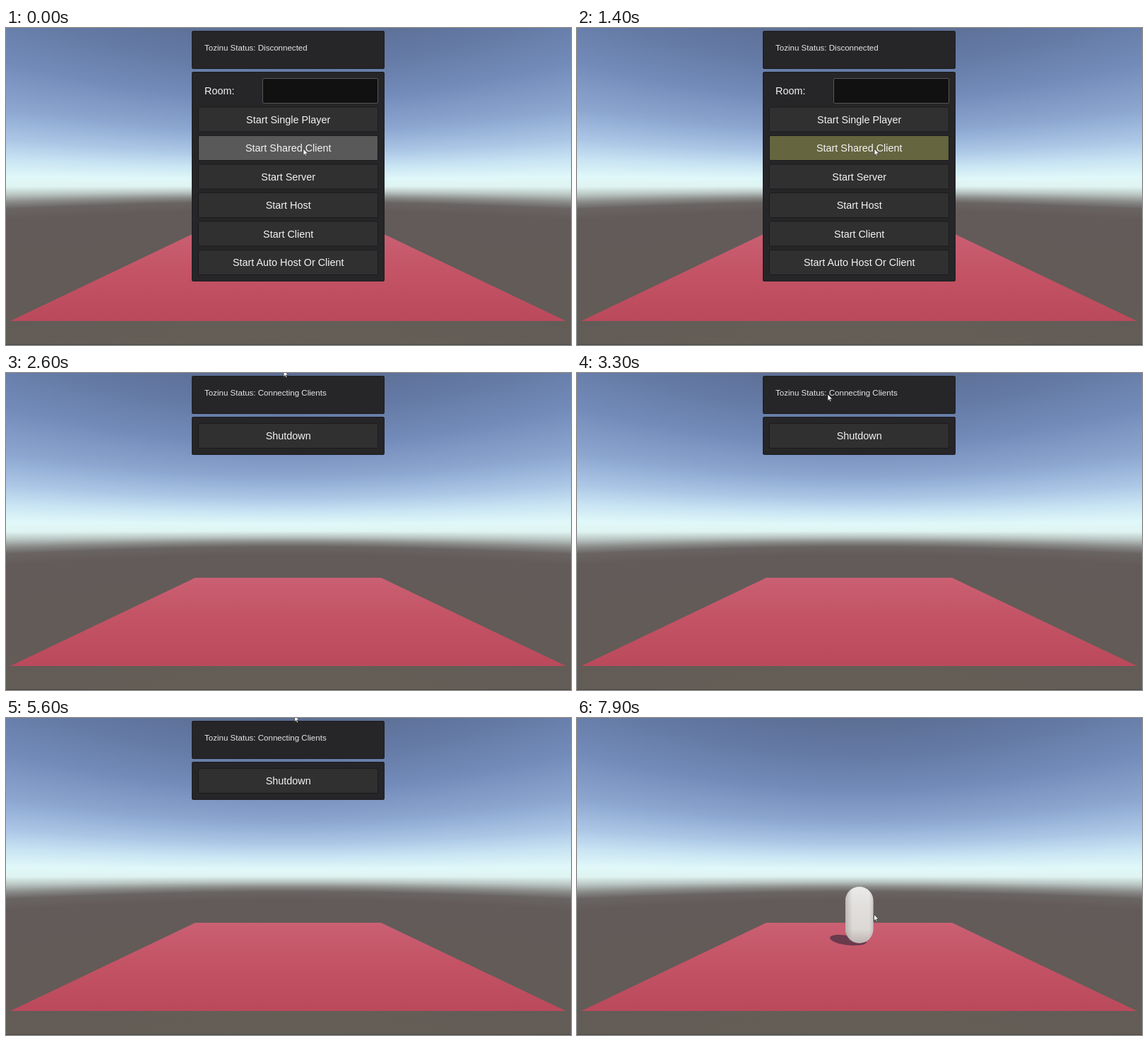
Animation of 800 by 449 pixels, one loop 8000 ms. Source, as an HTML page with a canvas:

```html
<!DOCTYPE html>
<html lang="en">
<head>
<meta charset="utf-8">
<title>Connection menu</title>
<style>
  html, body { margin: 0; width: 100%; height: 100%; overflow: hidden; background: #625b57; }
  canvas, svg { position: absolute; left: 0; top: 0; width: 800px; height: 449px; display: block; }
  text { font-family: "Liberation Sans", Arial, sans-serif; font-size: 14.4px; fill: #f4f4f4; }
  .status { font-size: 11.55px; fill: #e6e6e6; }
  .panel { fill: #262528; stroke: #1d1c1f; }
  .button { fill: #303030; stroke: #1b1b1c; }
</style>
</head>
<body>
<canvas id="sky" width="800" height="449"></canvas>
<svg viewBox="0 0 800 449">
  <defs>
    <linearGradient id="floorFill" x1="0" y1="0" x2="0" y2="1">
      <stop offset="0" stop-color="#ca6073"/>
      <stop offset=".45" stop-color="#c35365"/>
      <stop offset="1" stop-color="#ba4a5b"/>
    </linearGradient>
    <linearGradient id="bodyFill" x1="0" y1="0" x2="0" y2="1">
      <stop offset="0" stop-color="#ebebea"/>
      <stop offset=".3" stop-color="#e2e0de"/>
      <stop offset=".75" stop-color="#dcd8d5"/>
      <stop offset="1" stop-color="#bdb4b2"/>
    </linearGradient>
    <linearGradient id="bodyShade">
      <stop offset="0" stop-color="#77706e" stop-opacity=".35"/>
      <stop offset=".25" stop-color="#77706e" stop-opacity="0"/>
      <stop offset=".85" stop-color="#77706e" stop-opacity="0"/>
      <stop offset="1" stop-color="#77706e" stop-opacity=".2"/>
    </linearGradient>
  </defs>
  <path d="M268 290H531L793 415H6Z" fill="url(#floorFill)"/>
  <rect y="448" width="800" height="1" fill="#4b4743"/>
  <g id="player">
    <path d="M358 311C360 306 375 306 386 309L409 316C413 320 402 323 387 322C371 321 358 316 358 311Z" fill="#6a3a4d"/>
    <rect x="380" y="239" width="39.5" height="80" rx="19.7" fill="url(#bodyFill)"/>
    <rect x="380" y="239" width="39.5" height="80" rx="19.7" fill="url(#bodyShade)"/>
  </g>
  <g id="menu">
    <rect class="panel" x="263.5" y="4.5" width="272" height="53" rx="1.5"/>
    <rect class="panel" id="panel" x="263.5" y="62.5" width="272" rx="1.5"/>
    <text class="status" id="status" x="281" y="32"></text>
    <g id="startMenu">
      <text x="281" y="94.4">Room:</text>
      <rect x="363.5" y="71.5" width="163" height="35" rx="1.5" fill="#111" stroke="#555457"/>
    </g>
    <g id="runMenu"></g>
  </g>
  <path id="cursor" d="M0 0V9.4L2.1 7.4 3.5 10.6 5 10 3.6 6.9H6.6Z" fill="#fff" stroke="#222" stroke-width=".7"/>
</svg>
<script>
const LOOP = 8000, STEP = 100;
const PRESS = 1300, CONNECT = 1600, SPAWN = 7100;
const HORIZON = 222, FOCAL = 389;
const $ = id => document.getElementById(id);

// Bands of equal elevation spread away from the horizon towards the sides.
function paintSky() {
  const ctx = $("sky").getContext("2d");
  const bands = [
    [-222, "#5c6e93"], [-170, "#647aa5"], [-120, "#738bb9"], [-75, "#8ca6d0"],
    [-45, "#abc6e5"], [-25, "#c9e4f3"], [-8, "#e0f8f9"], [2, "#dff4f1"],
    [10, "#b9c5c2"], [17, "#8b8d8b"], [24, "#696463"], [35, "#635b5a"],
    [120, "#625b57"], [227, "#645f56"]
  ];
  const top = bands[0][0], span = bands[bands.length - 1][0] - top;
  for (let x = 0; x < 800; x++) {
    const spread = Math.hypot(FOCAL, x - 399.5) / FOCAL;
    const start = HORIZON + top * spread;
    const fill = ctx.createLinearGradient(0, start, 0, start + span * spread);
    bands.forEach(([y, color]) => fill.addColorStop((y - top) / span, color));
    ctx.fillStyle = fill;
    ctx.fillRect(x, 0, 1, 449);
  }
}

function make(parent, tag, attrs) {
  const node = document.createElementNS("http://www.w3.org/2000/svg", tag);
  for (const key in attrs) node.setAttribute(key, attrs[key]);
  return parent.appendChild(node);
}

function addButton(parent, label, row) {
  const y = 71 + row * 40.5;
  const box = make(parent, "rect", { class: "button", x: 272.5, y: y + .5, width: 254, height: 35, rx: 1.5 });
  make(parent, "text", { x: 399.7, y: y + 23.4, "text-anchor": "middle" }).textContent = label;
  return box;
}

const startButtons = ["Single Player", "Shared Client", "Server", "Host", "Client", "Auto Host Or Client"]
  .map((name, i) => addButton($("startMenu"), "Start " + name, i + 1));
const shutdown = addButton($("runMenu"), "Shutdown", 0);

// Pointer tip: time, x, y
const pointer = [
  [0, 421, 171], [2100, 421, 171], [2400, 405, 82], [2600, 393, -4], [2700, 390, -20],
  [3200, 362, -20], [3300, 355, 30], [3500, 340, 84], [3700, 337, 78], [3900, 338, 65],
  [5300, 338, 65], [5500, 385, 30], [5600, 408.5, -4], [5700, 416, -20],
  [7200, 410, -20], [7300, 411, 8], [7500, 418, 190], [7700, 420.5, 278], [8000, 420.5, 278]
];

function pointerAt(t) {
  const i = pointer.findIndex(key => key[0] > t);
  const [t0, x0, y0] = pointer[i - 1], [t1, x1, y1] = pointer[i];
  const k = (t - t0) / (t1 - t0);
  return [x0 + (x1 - x0) * k, y0 + (y1 - y0) * k];
}

const show = (id, on) => $(id).setAttribute("display", on ? "inline" : "none");

function render(time) {
  const t = Math.floor((time % LOOP) / STEP) * STEP;
  const connected = t >= CONNECT;
  const [x, y] = pointerAt(t);
  const over = x > 272 && x < 527 && y > 71 && y < 107;

  show("menu", t < SPAWN);
  show("player", t >= SPAWN);
  show("startMenu", !connected);
  show("runMenu", connected);
  $("panel").setAttribute("height", connected ? 53 : 296);
  $("status").textContent = "Tozinu Status: " + (connected ? "Connecting Clients" : "Disconnected");
  startButtons[1].style.fill = t >= PRESS ? "#65653f" : "#595959";
  shutdown.style.fill = over ? "#595959" : "#303030";
  $("cursor").setAttribute("transform", `translate(${x} ${y})`);
}

paintSky();
render(0);
const began = performance.now();
(function tick() {
  render(performance.now() - began);
  requestAnimationFrame(tick);
})();
</script>
</body>
</html>
```
